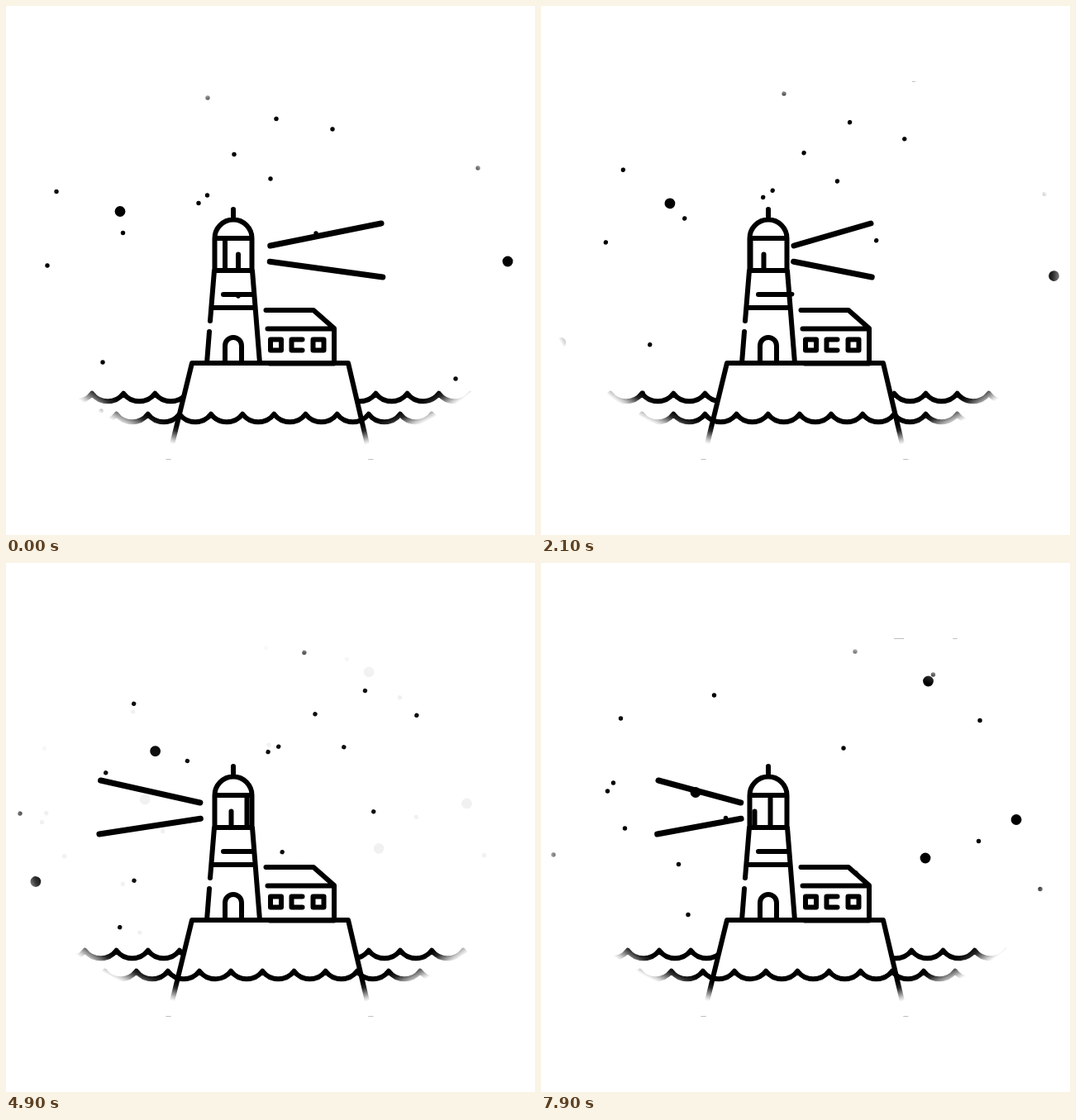
An HTML page for the animation above (8000 ms loop, 640 px wide and 640 px high).

```html
<!DOCTYPE html>
<html lang="en">
<head>
<meta charset="utf-8">
<title>Lighthouse</title>
<style>
  html, body { margin: 0; width: 100%; height: 100%; overflow: hidden; background: #fff; }
  svg { display: block; width: 100vw; height: 100vh; }
  .line { fill: none; stroke: #000; stroke-width: 6; stroke-linecap: round; stroke-linejoin: round; }
  #beam { stroke-width: 7; }
</style>
</head>
<body>
<svg viewBox="0 0 640 640">
  <defs>
    <radialGradient id="fade" gradientUnits="userSpaceOnUse" cx="0" cy="0" r="1.05"
      gradientTransform="translate(320 320) scale(306 215)">
      <stop offset=".9" stop-color="#fff"/>
      <stop offset=".93" stop-color="#fff" stop-opacity=".85"/>
      <stop offset=".98" stop-color="#fff" stop-opacity=".2"/>
      <stop offset="1" stop-color="#fff" stop-opacity="0"/>
    </radialGradient>
    <mask id="oval" maskUnits="userSpaceOnUse" x="0" y="0" width="640" height="640" style="color-interpolation:sRGB">
      <rect x="12" y="91" width="617" height="458" fill="url(#fade)"/>
      <path d="M12 91h617v1h-617zM12 548h617v1h-617z" fill="#fff" fill-opacity=".25"/>
    </mask>
    <clipPath id="lamp"><rect x="250" y="281" width="50" height="40"/></clipPath>
  </defs>
  <g mask="url(#oval)">
    <path id="farWave" class="line"/>
    <path class="line" style="fill:#fff" d="M193.7 560 L225 432 H414 L444 560"/>
    <path id="nearWave" class="line"/>
    <g class="line">
      <!-- tower -->
      <path d="M275 246V258 M252.5 320V281A22.5 22.5 0 0 1 297.5 281V320 M252.5 281H297.5 M252 320H298
        M252 320L247 381 M246 394L243 432 M298 320L307 432 M249 365H301 M263 349H299
        M265 432V411A10 10 0 0 1 285 411V432"/>
      <!-- house -->
      <path d="M314.5 368H372L397 390V432 M316.5 390.5H397 M319 432.5H397
        M320 403.5h13v13h-13z M358.5 403.5H345.5V416.5H358.5 M371.5 403.5h13v13h-13z"/>
      <path id="bars" clip-path="url(#lamp)"/>
      <path id="beam"/>
    </g>
    <g id="stars"></g>
  </g>
</svg>
<script>
const LOOP = 8, STEP = 0.1, WAVE = 38.15;
const $ = id => document.getElementById(id);

// Each layer: positions [x, y, ...] at time `at`, turning about (cx, cy) at `speed` degrees per second.
const layers = [
  { r: 2.7, speed: 3.08, cx: 312.5, cy: 551, at: 0, leaving: true, pts: [
    327,136.5, 395,149, 276,179.5, 320,209, 243.5,229, 233,238.5, 141.5,274.5, 50,314,
    61,224.5, 117,431, 544,451, 375,275, 244,111, 571,196, 281,351, 115,490, -37.4,388.6,
    479.4,78, 398,77] },
  { r: 6.4, speed: 1.59, cx: 312.5, cy: 551, at: 0, leaving: true, pts: [
    138,248.5, 607,309, 16,424.5] },
  { r: 2.7, speed: 2.82, cx: 316, cy: 546, at: 7.9, pts: [
    209.5,160, 366,224, 531,190.5, 529.5,336.5, 604,394.5, 223.5,308.5, 87.5,266, 80.5,276,
    101.5,321, 166.5,364.5, 178,425.5, 96.5,188, 474.5,135, 380,107, 501,91, 15,353, 381,375] },
  { r: 6.4, speed: 1.38, cx: 296.5, cy: 543.5, at: 7.9, pts: [
    468.5,143, 187,277.5, 575,310.5, 465,357, 433,90] }
];

for (const layer of layers) {
  layer.g = document.createElementNS("http://www.w3.org/2000/svg", "g");
  for (let i = 0; i < layer.pts.length; i += 2) {
    const star = document.createElementNS("http://www.w3.org/2000/svg", "circle");
    star.setAttribute("cx", layer.pts[i]);
    star.setAttribute("cy", layer.pts[i + 1]);
    star.setAttribute("r", layer.r);
    layer.g.append(star);
  }
  $("stars").append(layer.g);
}

const beamReach = [[0, 179], [1.3, 163], [2.1, 124], [3.3, -50], [4.9, -160.5], [5.5, -173], [6.1, -171], [7.9, -133], [8, -130]];
const lampShift = [[0, 0], [1.3, 5.5], [2.1, 11.5], [3.3, 28], [4.9, 46.5], [6.1, 51], [7.9, 60.5], [8, 61.1]];

// Smooth curve through [time, value] keys.
function track(keys, t) {
  const last = keys.length - 1;
  let i = 0;
  while (i < last - 1 && t >= keys[i + 1][0]) i++;
  const slope = k => {
    const a = keys[Math.max(k - 1, 0)], b = keys[Math.min(k + 1, last)];
    return (b[1] - a[1]) / (b[0] - a[0]);
  };
  const [t0, v0] = keys[i], [t1, v1] = keys[i + 1];
  const h = t1 - t0, u = (t - t0) / h, w = 1 - u;
  return v0 * w * w * (1 + 2 * u) + v1 * u * u * (3 - 2 * u)
    + h * u * w * (slope(i) * w - slope(i + 1) * u);
}

function wave(id, crest, y) {
  const start = crest % WAVE;
  $(id).setAttribute("d", `M${start} ${y}` + `a23.9 23.9 0 0 0 ${WAVE} 0`.repeat(16));
}

function draw(t) {
  wave("farWave", 104 + 2 * WAVE - t * WAVE / 4, 468.7);
  wave("nearWave", 248 + t * WAVE / 3, 493.7);

  const s = track(beamReach, t), x = k => 275 + s * k;
  $("beam").setAttribute("d", `M${x(.25)} 290L${x(1)} 263M${x(.247)} 309.3L${x(1.01)} 328`);

  const d = track(lampShift, t);
  $("bars").setAttribute("d",
    [265, 338].map(b => `M${b - d} 281V320`).join("") +
    [281, 319].map(b => `M${b - d} 300.5V320`).join(""));

  const mix = Math.min(1, Math.max(0, (t - 4.77) / 2.38));
  for (const { g, speed, cx, cy, at, leaving } of layers) {
    g.setAttribute("transform", `rotate(${speed * (t - at)} ${cx} ${cy})`);
    g.setAttribute("opacity", leaving ? 1 - mix : mix);
  }
}

const begin = performance.now();
function frame() {
  const t = (performance.now() - begin) / 1000 % LOOP;
  draw(Math.floor(t / STEP + 1e-6) * STEP);
  requestAnimationFrame(frame);
}
frame();
</script>
</body>
</html>
```
